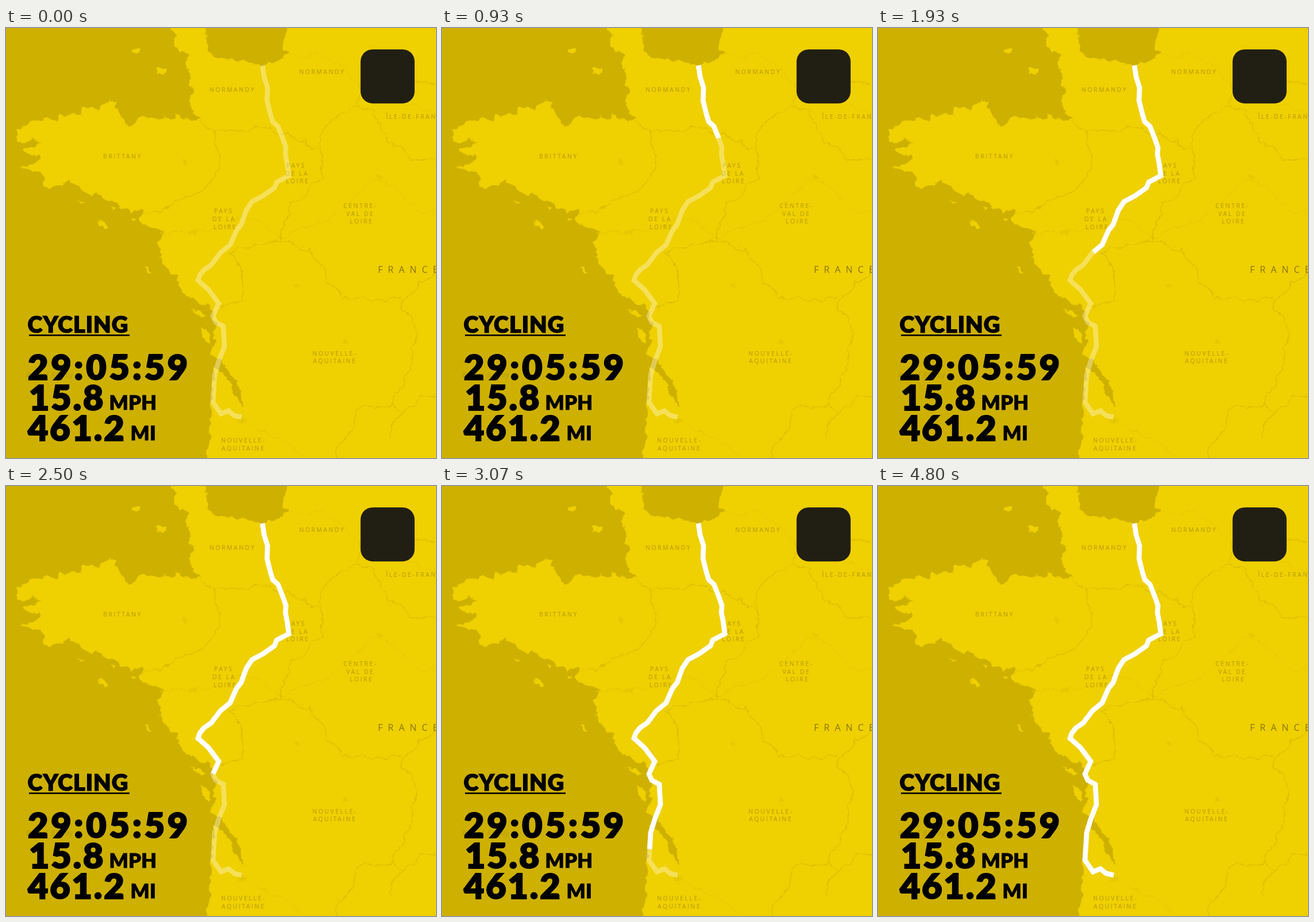
An HTML page for the animation above (4.91 s loop, 748x748 px).

```html
<!DOCTYPE html>
<html lang="en">
<head>
<meta charset="utf-8">
<title>Cycling route</title>
<style>
  html, body { margin: 0; width: 100%; height: 100%; overflow: hidden; background: #ceb000; }
  svg { position: absolute; left: 0; top: 0; width: 748px; height: 748px; }

  .land { fill: #efd000; }
  .sea { fill: #ceb000; }
  .borders { fill: none; stroke: #d5b900; stroke-width: 1.1; }
  .rivers { fill: none; stroke: #e4c700; stroke-width: 1; }
  .towns { fill: #e5c800; }

  .labels { font: 10.5px "Open Sans", "Noto Sans", sans-serif; letter-spacing: 2.5px; fill: #b39900; }
  .labels .country { font-size: 16px; letter-spacing: 9px; fill: #897400; }
  .labels .bay { font-size: 12px; font-style: italic; letter-spacing: 1px; fill: #b59a00; }

  .route { fill: none; stroke: #fff; stroke-width: 8.6; stroke-linejoin: miter; }
  .trail { opacity: .34; }
  .drawn {
    stroke-dasharray: 1 2;
    stroke-dashoffset: 1;
    animation: draw 4910ms infinite;
  }
  /* waits 0.4 s, draws for 3 s at 30 steps per second, then holds */
  @keyframes draw {
    0% { stroke-dashoffset: 1; }
    8.045% { stroke-dashoffset: 1; animation-timing-function: steps(90); }
    69.145%, 100% { stroke-dashoffset: 0; }
  }

  .stats { font: 900 61px Lato, "Open Sans", sans-serif; letter-spacing: 2.9px; }
  .stats text { stroke: #000; stroke-width: 2; }
  .stats .time { letter-spacing: 4.8px; }
  .stats .title { font-size: 39.5px; letter-spacing: 1px; stroke-width: 1.2; }
  .stats .unit { font-size: 34.5px; letter-spacing: .3px; stroke-width: .8; }
</style>
</head>
<body>
<svg viewBox="0 0 748 748">
  <defs>
    <filter id="rough" filterUnits="userSpaceOnUse" x="-30" y="-30" width="808" height="808" color-interpolation-filters="sRGB">
      <feTurbulence type="fractalNoise" baseFrequency=".075" numOctaves="4" seed="7"/>
      <feDisplacementMap in="SourceGraphic" scale="12" xChannelSelector="R" yChannelSelector="G"/>
    </filter>
  </defs>

  <g filter="url(#rough)">
    <g class="land">
      <!-- mainland north of the Loire -->
      <path d="M286-20 288 2 300 11 291 20 294 32 304 40 317 48 313 60 320 76 318 92 326 108 318 125 322 140 330 152
        337 158 322 160 305 158 296 150 290 160 277 153 263 160 252 154 240 152 226 161 215 172 207 163 199 150
        188 142 190 130 180 125 170 132 160 142 150 138 134 138 130 150 116 147 104 155 93 150 88 163 72 156
        60 160 42 165 20 177 18 195 30 201 48 193 60 200 46 207 28 211 40 222 56 221 60 232 45 238 24 242
        40 248 58 248 66 262 64 275 76 278 100 272 108 265 118 272 130 281 150 291 158 286 170 297 185 301
        200 312 220 318 236 316 240 322 232 335 246 345 268 350H790V-20Z"/>
      <!-- mainland to the south -->
      <path d="M246 345 262 350 276 354 270 362 262 372 270 384 267 400 274 412 284 424 296 433 300 450 312 464 330 474
        352 484 362 494 357 504 366 514 360 530 366 545 357 560 364 582 362 600 360 625 357 650 355 690 349 770
        H790V340Z"/>
      <!-- islands -->
      <path d="M218 43 225 35 233 33 230 44ZM258 70 277 69 278 80 262 79ZM160 337 170 340 179 347 168 348Z
        M242 414 249 418 254 429 247 425ZM322 489 335 492 350 501 340 504ZM338 519 350 525 358 545 354 552 344 538Z
        M126 301 136 303 128 306ZM185 311 191 315 186 317ZM218 329 226 333 220 336Z"/>
    </g>

    <g class="sea">
      <path d="M346-20 347 12 352 26 351 42 366 50 385 55 420 58 446 65 470 59 495 43 482 37 484 20 494-20Z"/>
      <path d="M354 564 372 578 385 592 400 612 405 630 413 659 408 657 398 638 391 619 378 600 358 587Z"/>
    </g>

    <g class="rivers">
      <path d="M270 358 322 353 380 348 405 329 440 335 476 366 520 347 562 335 600 300 640 262 665 270 700 300 722 322 750 318"/>
      <path d="M495 44 520 50 545 44 575 60 605 90 640 112 690 125 750 150"/>
      <path d="M410 675 440 700 480 715 520 748"/>
    </g>

    <g class="borders">
      <path d="M337 158 348 172 365 178 362 195 370 215 372 245 350 275 330 290 300 298 270 320 240 322"/>
      <path d="M365 178 385 180 410 178 430 176 445 170 462 178 478 185 488 180 500 192 520 198 530 210 548 214 552 225"/>
      <path d="M552 225 545 200 550 180 565 160 590 146 610 136 618 112 612 98 640 92 668 96 700 92 750 96"/>
      <path d="M552 222 548 245 550 262 530 275 520 295 495 305 490 330 480 350 476 370"/>
      <path d="M476 370 440 378 410 382 390 388 400 405 410 425 412 450 410 475 385 482 368 485"/>
      <path d="M476 370 495 372 520 388 530 385 535 400 553 415 556 440 575 452 585 470 620 470 650 475 685 468"/>
      <path d="M750 420 740 435 720 440 712 458 690 470 690 490 708 505 716 530 705 560 708 580 695 605 690 625 675 640 672 655"/>
      <path d="M575 750 575 728 595 712 605 690 608 665 622 655 640 662 660 660 672 655 690 668 705 660 720 640 750 642"/>
      <path d="M690 668 675 684 668 705 672 712"/>
      <path d="M612 136 640 145 650 170 665 200 690 208 702 228 750 230"/>
    </g>
    <g class="towns">
      <path d="M308 228h9v9h-9ZM318 353h14v7h-14ZM646 256h10v6h-10ZM586 542h7v10h-7ZM500 444h9v6h-9ZM405 680h12v8h-12Z"/>
    </g>
  </g>

  <g class="labels">
    <text x="354" y="111">NORMANDY</text>
    <text x="510" y="80">NORMANDY</text>
    <text x="661" y="158">ÎLE-DE-FRANCE</text>
    <text x="169" y="227">BRITTANY</text>
    <text x="488" y="243">PAYS</text>
    <text x="486" y="257">DE LA</text>
    <text x="487" y="270">LOIRE</text>
    <text x="362" y="322">PAYS</text>
    <text x="359" y="336">DE LA</text>
    <text x="361" y="350">LOIRE</text>
    <text x="587" y="313">CENTRE-</text>
    <text x="592" y="327">VAL DE</text>
    <text x="598" y="340">LOIRE</text>
    <text x="533" y="570">NOUVELLE-</text>
    <text x="534" y="583">AQUITAINE</text>
    <text x="374" y="721">NOUVELLE-</text>
    <text x="375" y="735">AQUITAINE</text>
    <text class="country" x="647" y="426">FRANCE</text>
    <text class="bay" x="35" y="608">Bay of Biscay</text>
  </g>
</svg>

<svg viewBox="0 0 748 748">
  <defs>
    <path id="track" pathLength="1" d="M446 65 449 85 455 104 454 126 460 150 464 163 473 171 481 191 487 208 486 220
      489 235 492 257 471 268 467 278 447 292 428 302 418 317 409 342 401 352 390 377 373 391 357 412 344 421
      337 430 334 439 352 455 370 479 360 501 365 512 378 519 380 554 370 580 363 603 360 651 374 671 387 666
      397 674 410 677"/>
  </defs>
  <use class="route trail" href="#track"/>
  <use class="route drawn" href="#track"/>
</svg>

<svg viewBox="0 0 748 748">
  <rect x="616.8" y="37.2" width="94" height="94" rx="21" fill="#211e14"/>
  <g class="stats">
    <text class="title" x="37.5" y="529.5">CYCLING</text>
    <rect x="40" y="533.2" width="175" height="2.6"/>
    <text class="time" x="38" y="611.5">29:05:59</text>
    <text x="40" y="664.5">15.8</text>
    <text class="unit" x="179.5" y="663.5">MPH</text>
    <text x="38" y="718">461.2</text>
    <text class="unit" x="216.5" y="717">MI</text>
  </g>
</svg>
</body>
</html>
```
